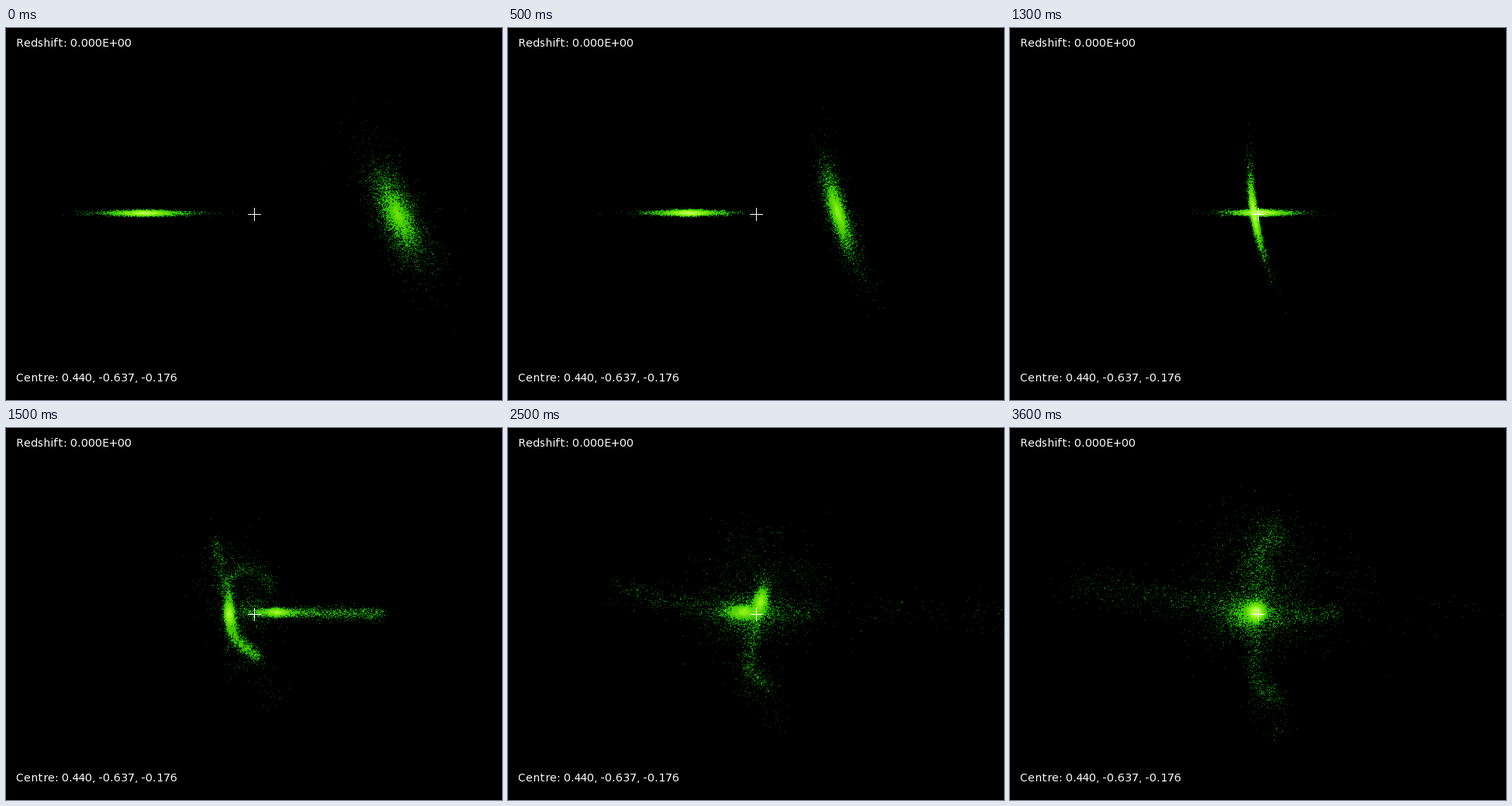
These frames come from a looping animation (640 by 480 pixels, 4000 ms). A matplotlib script:

```python
import numpy as np
import matplotlib.pyplot as plt
from matplotlib.animation import FuncAnimation

W, H, DPI = 640, 480, 80
STEPS, STEP_MS = 8, 500
LAST_POSE = 6          # the merged pose is held for two steps
PASSAGE = 2            # step at which the two discs meet

# Key positions of the two cores, one per step.
LEFT_X = [179, 233, 323, 350, 345, 304, 317]
RIGHT_X = [505.5, 425.5, 315, 288, 298.5, 326, 318]
RIGHT_Y = [241, 238, 240, 239, 238, 224, 238]

plt.rcParams["text.hinting_factor"] = 1   # whole-pixel glyph advances


class Cloud:
    """Collects particles, in pixels with y pointing down."""

    def __init__(self, seed):
        self.rng = np.random.default_rng(seed)
        self.parts = []

    def disc(self, n, cx, cy, scale, ratio, deg=0, thick=1.0, bend=0.0):
        """Exponential disc seen at an angle; ratio 0 is edge-on."""
        n = int(n)
        r = self.rng.gamma(2, scale, n)
        phi = self.rng.uniform(0, 2 * np.pi, n)
        u = r * np.cos(phi)
        v = r * np.sin(phi) * ratio + self.rng.normal(0, thick, n) + bend * u**2
        a = np.radians(deg)
        self.parts.append((cx + u * np.cos(a) - v * np.sin(a),
                           cy + u * np.sin(a) + v * np.cos(a)))

    def blob(self, n, cx, cy, sx, sy):
        n = int(n)
        self.parts.append((self.rng.normal(cx, sx, n), self.rng.normal(cy, sy, n)))

    def stream(self, n, points, w0, w1, power=1.0):
        """Particles along a path whose width goes from w0 to w1."""
        px, py = np.array(points, float).T
        length = np.r_[0, np.cumsum(np.hypot(np.diff(px), np.diff(py)))]
        t = self.rng.random(int(n)) ** power
        width = w0 + (w1 - w0) * t
        s = t * length[-1]
        self.parts.append((self.rng.normal(np.interp(s, length, px), width),
                           self.rng.normal(np.interp(s, length, py), width)))

    def counts(self):
        x, y = (np.concatenate(c) for c in zip(*self.parts))
        return np.histogram2d(y, x, bins=(H, W), range=((0, H), (0, W)))[0]


def intact_discs(cloud, step, left, right):
    """Two discs closing in, the right one turning edge-on."""
    cloud.disc(5500, *left, 13 - 1.5 * step, 0, thick=1.8)
    cloud.disc(6000, *right, 16.5 - 2 * step, 0.36 - 0.15 * step,
               66 + 7.5 * step, thick=1.7, bend=-0.0006 * step)


def stripped_cores(cloud, step, left, right, merge):
    shrink = 1 - 0.5 * merge**2
    cloud.disc(3000, *left, 8 * shrink, 0, thick=2.6 + 3 * merge)
    cloud.disc(3000, *right, 6.5 * shrink, 0.06, 66 + 7.5 * step,
               thick=3 + 2 * merge)
    cloud.disc(1600 * merge, 308, 242, 9.5, 0.85)


def tidal_debris(cloud, age, left, right, merge):
    """Tails and halo, longer, wider and thinner as they age."""
    lx, ly = left
    rx, ry = right
    cloud.disc(400 * age, 318, 236, 8 + 3 * age, 0.65)

    # Horizontal wings of the left disc.
    cloud.stream(1200 / age - 200, [(lx + 22, ly), (320 + 165 * age, 241 - age)],
                 4 * age, 4.5 * age)
    cloud.stream(250 * (age - 1), [(lx - 15, ly), (320 - 60 * age, 238 - 10 * age)],
                 9, 3.5 * age, 2)
    cloud.stream(130 * (age - 1), [(lx + 12, ly + 8), (320 + 26 * age, 238)], 10, 6)

    # Hooked tail below the right disc.
    knee = np.array([295 + 1.4 * age**2, 254 + 19 * age])
    tip = knee + (28, 22)
    cloud.stream(1900 / age, [right, knee, tip], 3 + age, 4 + age / 2, 1.2)
    cloud.stream(30, [tip, tip + (15, 55)], 10, 10)
    cloud.blob(100, *(knee + (9, 12)), 13, 17)

    # Fan above it, with a bow opening to the right.
    cloud.stream(330 / age**1.5, [(rx, ry - 10), (262 + 8 * age, 160 - 15 * age)],
                 5 * age, 5 * age)
    cloud.blob(200 / age, 290, 192, 24, 23)
    arc = np.linspace(np.pi, 2 * np.pi, 20)
    bow = np.c_[282 + 30 * age + (20 + 9 * age) * np.cos(arc),
                214 + 33 * np.sin(arc)]
    cloud.stream(280 / age, bow, 1 + 3 * age, 1 + 3 * age)

    # Plume thrown up by the merger.
    burst = merge**4
    cloud.stream(850 * burst, [(318, 215), (320, 165), (343, 128)], 15, 11)
    cloud.blob(300 * burst, 322, 160, 42, 30)


def build(step):
    cloud = Cloud(20 + step)
    left = (LEFT_X[step], 239 - 0.3 * step)
    right = (RIGHT_X[step], RIGHT_Y[step])
    if step <= PASSAGE:
        intact_discs(cloud, step, left, right)
    else:
        merge = max(0, step - 4) / 2
        stripped_cores(cloud, step, left, right, merge)
        tidal_debris(cloud, step - PASSAGE, left, right, merge)
    return cloud


def render(step):
    n = build(step).counts()
    near = sum(np.roll(n, (i, j), (0, 1)) for i in (-1, 0, 1) for j in (-1, 0, 1))
    glow = np.clip(np.log2(np.maximum(near, 1)) / 8, 0, 1)
    rgb = np.stack([190 * glow**2, 100 + 165 * glow, 90 * glow**8], -1)
    rgb[n == 0] = 0
    rgb[240, 312:329] = 255
    rgb[232:249, 320] = 255
    return np.clip(rgb, 0, 255).astype(np.uint8)


fig = plt.figure(figsize=(W / DPI, H / DPI), dpi=DPI, facecolor="black")
ax = fig.add_axes([0, 0, 1, 1])
ax.axis("off")
view = ax.imshow(render(0), extent=(0, W, H, 0), aspect="auto",
                 interpolation="nearest")
label = dict(color="white", family="DejaVu Sans", size=14 * 72 / DPI)
ax.text(13, 24, "Redshift: 0.000E+00", **label)
ax.text(13, 456, "Centre: 0.440, -0.637, -0.176", **label)


def update(frame):
    view.set_data(render(min(frame, LAST_POSE)))
    return [view]


anim = FuncAnimation(fig, update, frames=STEPS, interval=STEP_MS,
                     repeat=True, repeat_delay=0, blit=False)
plt.show()
```
